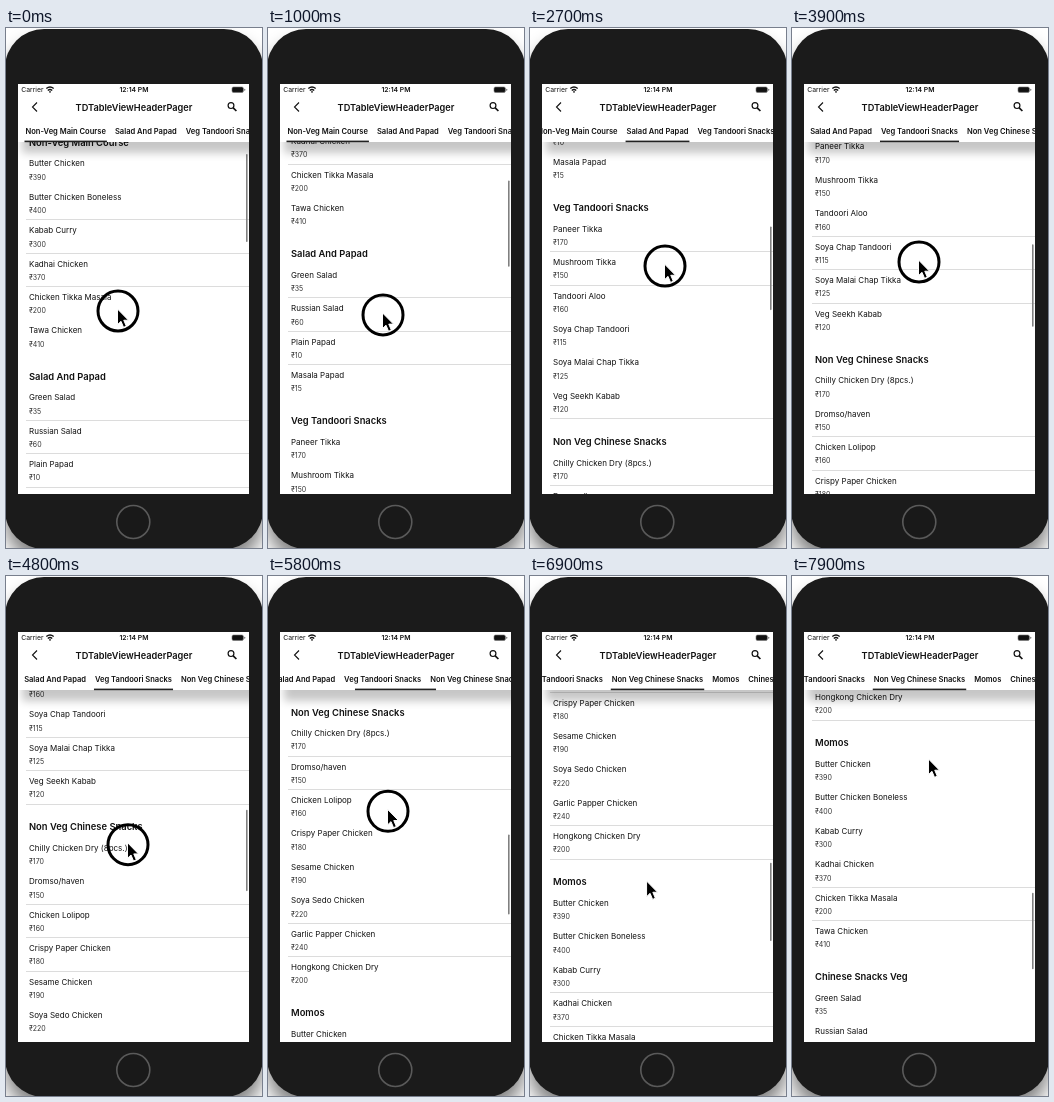
These frames come from a looping animation (256 px wide and 520 px high, 8 s). An HTML page:

```html
<!DOCTYPE html>
<html lang="en">
<head>
<meta charset="utf-8">
<title>Table header pager</title>
<style>
html, body { margin: 0; width: 100%; height: 100%; overflow: hidden; background: #fff; }
body > svg { display: block; width: 256px; height: 520px; }
text { font-family: Inter, "Noto Sans", sans-serif; fill: #111; }
.name { font-size: 8px; }
.price { font-size: 7px; fill: #333; }
.head { font-size: 9.4px; font-weight: 600; }
.tab { font-size: 7.55px; font-weight: 600; }
.status { font-size: 6.8px; }
.title { font-size: 9.2px; font-weight: 600; }
.shade { filter: blur(4px); opacity: .22; }
.glow { filter: blur(9px); opacity: .5; }
</style>
</head>
<body>
<svg viewBox="0 0 256 520">
  <rect class="glow" x="-1" y="14" width="258" height="520" rx="40"/>
  <rect x="-1" y="1" width="258" height="520" rx="39" fill="#1b1b1b"/>
  <circle cx="127.3" cy="494" r="16.5" fill="#191919" stroke="#5a5a5a" stroke-width="1.6"/>
  <rect x="12" y="56" width="231" height="410" fill="#fff"/>

  <svg x="12" y="114" width="231" height="352" viewBox="12 114 231 352">
    <g id="list"></g>
    <g id="lines" fill="#dcdcdc"></g>
    <rect id="bar" x="240" width="1.6" rx=".8" fill="#808080"/>
    <rect class="shade" x="16" y="90" width="240" height="35"/>
  </svg>

  <text class="status" x="15.3" y="64.3">Carrier</text>
  <path d="M40.3 60.6Q44 57.4 47.7 60.6M41.8 62.4Q44 60.5 46.2 62.4M44 63v1.8" fill="none" stroke="#111" stroke-width="1.3"/>
  <text class="status" x="128" y="64.3" text-anchor="middle" font-weight="600">12:14 PM</text>
  <rect x="226" y="59" width="11.4" height="5.4" rx="1.5" fill="#111" stroke="#777" stroke-width=".6"/>
  <rect x="238.2" y="60.7" width="1" height="2" rx=".5" fill="#777"/>
  <path d="M31 74.5L26.5 79L31 83.5" fill="none" stroke="#111" stroke-width="1.1"/>
  <text class="title" x="128" y="82.9" text-anchor="middle">TDTableViewHeaderPager</text>
  <g fill="none" stroke="#111">
    <circle cx="225" cy="77.6" r="2.9" stroke-width="1.2"/>
    <path d="M227.2 79.8L230.4 83" stroke-width="1.7"/>
  </g>

  <svg x="12" y="92" width="231" height="23" viewBox="12 92 231 23">
    <g id="tabs"><rect id="mark" y="112.6" height="1.6" fill="#222"/></g>
  </svg>

  <g id="cursor">
    <circle id="press" cy="2" r="20" fill="none" stroke="#000" stroke-width="3"/>
    <path transform="translate(-.5 0) scale(1.1)" d="M0 0V14.2L3.2 11.2L5.5 16.7L8 15.6L5.7 10.2H10Z" stroke="#fff" stroke-width=".9"/>
  </g>
</svg>
<script>
const $ = id => document.getElementById(id);
const PITCH = 33.41, FIRST = 135.5, MIDDLE = 127.5;
const GLIDE = 150; // ms in which a released list slows down

const mains = ['Butter Chicken 390', 'Butter Chicken Boneless 400', 'Kabab Curry 300',
  'Kadhai Chicken 370', 'Chicken Tikka Masala 200', 'Tawa Chicken 410'];
const salads = ['Green Salad 35', 'Russian Salad 60', 'Plain Papad 10', 'Masala Papad 15'];
const sections = [
  ['Non-Veg Main Course', mains],
  ['Salad And Papad', salads],
  ['Veg Tandoori Snacks', ['Paneer Tikka 170', 'Mushroom Tikka 150', 'Tandoori Aloo 160',
    'Soya Chap Tandoori 115', 'Soya Malai Chap Tikka 125', 'Veg Seekh Kabab 120']],
  ['Non Veg Chinese Snacks', ['Chilly Chicken Dry (8pcs.) 170', 'Dromso/haven 150',
    'Chicken Lolipop 160', 'Crispy Paper Chicken 180', 'Sesame Chicken 190',
    'Soya Sedo Chicken 220', 'Garlic Papper Chicken 240', 'Hongkong Chicken Dry 200']],
  ['Momos', mains],
  ['Chinese Snacks Veg', salads]
];

// Each swipe drags the list up; the last entry is where the cursor ends.
const swipes = [
  { down: 0, up: 250, x: 112, from: 281, to: 211.85 },
  { down: 950, up: 1330, x: 115, from: 297, to: 205 },
  { down: 2100, up: 2750, x: 135, from: 332.7, to: 228 },
  { down: 3500, up: 4250, x: 127, from: 282.05, to: 188.2 },
  { down: 4700, up: 5000, x: 122, from: 285, to: 230 },
  { down: 5698, up: 5916, x: 120, from: 283.5, to: 176.25 },
  { down: 7000, up: 7560, x: 117, from: 308.2, to: 196.2 },
  { down: 8000, up: 8000, x: 140, from: 181, to: 181 }
];
const tabTimes = [1400, 3560, 5730];

function set(el, attrs) {
  for (const key in attrs) el.setAttribute(key, attrs[key]);
}
function add(parent, tag, attrs, text = '') {
  const el = document.createElementNS('http://www.w3.org/2000/svg', tag);
  set(el, attrs);
  el.textContent = text;
  return $(parent).appendChild(el);
}
const mix = (a, b, u) => a + (b - a) * u;
const clamp = u => Math.min(1, Math.max(0, u));
const smooth = u => u * u * (3 - 2 * u);

const lines = [], marks = [];
let slot = 0, tabX = 19.5;
for (const [title, rows] of sections) {
  const label = (cls, dy, text) =>
    add('list', 'text', { class: cls, x: 23, y: FIRST + PITCH * (slot - 1) + dy }, text);
  const tab = add('tabs', 'text', { class: 'tab', x: tabX, y: 105.7 }, title);
  const width = tab.getComputedTextLength();
  marks.push({ x: tabX - 1, width: width + 2, scroll: Math.max(0, tabX + width / 2 - MIDDLE) });
  tabX += width + 9;

  label('head', 15.8, title);
  slot++;
  for (const row of rows) {
    const cut = row.lastIndexOf(' ');
    label('name', 2.9, row.slice(0, cut));
    label('price', 16.2, '₹' + row.slice(cut + 1));
    lines.push({ slot, el: add('lines', 'rect', { x: 20, width: 223, height: 1 }) });
    slot++;
  }
}

function scrollAt(t) {
  let sum = 0;
  for (const { down, up, from, to } of swipes) {
    if (t <= down) break;
    const speed = (from - to) / (up - down);
    const coast = 1 - Math.exp(-Math.max(0, t - up) / GLIDE);
    sum += speed * (Math.min(t, up) - down + GLIDE * coast);
  }
  return sum;
}

function drawCursor(t) {
  const i = swipes.findLastIndex(s => t >= s.down);
  const now = swipes[i], next = swipes[i + 1];
  const pressed = t < now.up;
  const back = smooth(clamp((t - now.up) / (next.down - now.up)));
  const x = mix(now.x, next.x, back);
  const y = pressed
    ? mix(now.from, now.to, (t - now.down) / (now.up - now.down))
    : mix(now.to, next.from, back);
  set($('cursor'), { transform: `translate(${x} ${y})` });
  set($('press'), { visibility: pressed ? 'visible' : 'hidden' });
}

function drawTabs(t) {
  let { x, width, scroll } = marks[0];
  tabTimes.forEach((start, i) => {
    const u = smooth(clamp((t - start) / 300)), goal = marks[i + 1];
    x = mix(x, goal.x, u);
    width = mix(width, goal.width, u);
    scroll = mix(scroll, goal.scroll, u);
  });
  set($('tabs'), { transform: `translate(${-scroll} 0)` });
  set($('mark'), { x, width });
}

function drawList(scroll) {
  set($('list'), { transform: `translate(0 ${-scroll})` });
  // Hairlines drop out in a beat that drifts with the scroll.
  for (const { slot, el } of lines) {
    const phase = (0.18 * (slot - 2) + 2 * scroll + 1.03) % 1;
    set(el, {
      y: Math.round(FIRST + PITCH * (slot - 1) + 22.5 - scroll),
      visibility: phase < 0.5 ? 'visible' : 'hidden'
    });
  }
  set($('bar'), { y: 126 + 0.216 * scroll, height: 88 - 0.013 * scroll });
}

const begin = performance.now();
function tick() {
  const t = Math.floor((performance.now() - begin) / 100) * 100 % 8000;
  drawList(scrollAt(t));
  drawTabs(t);
  drawCursor(t);
  requestAnimationFrame(tick);
}
tick();
</script>
</body>
</html>
```
